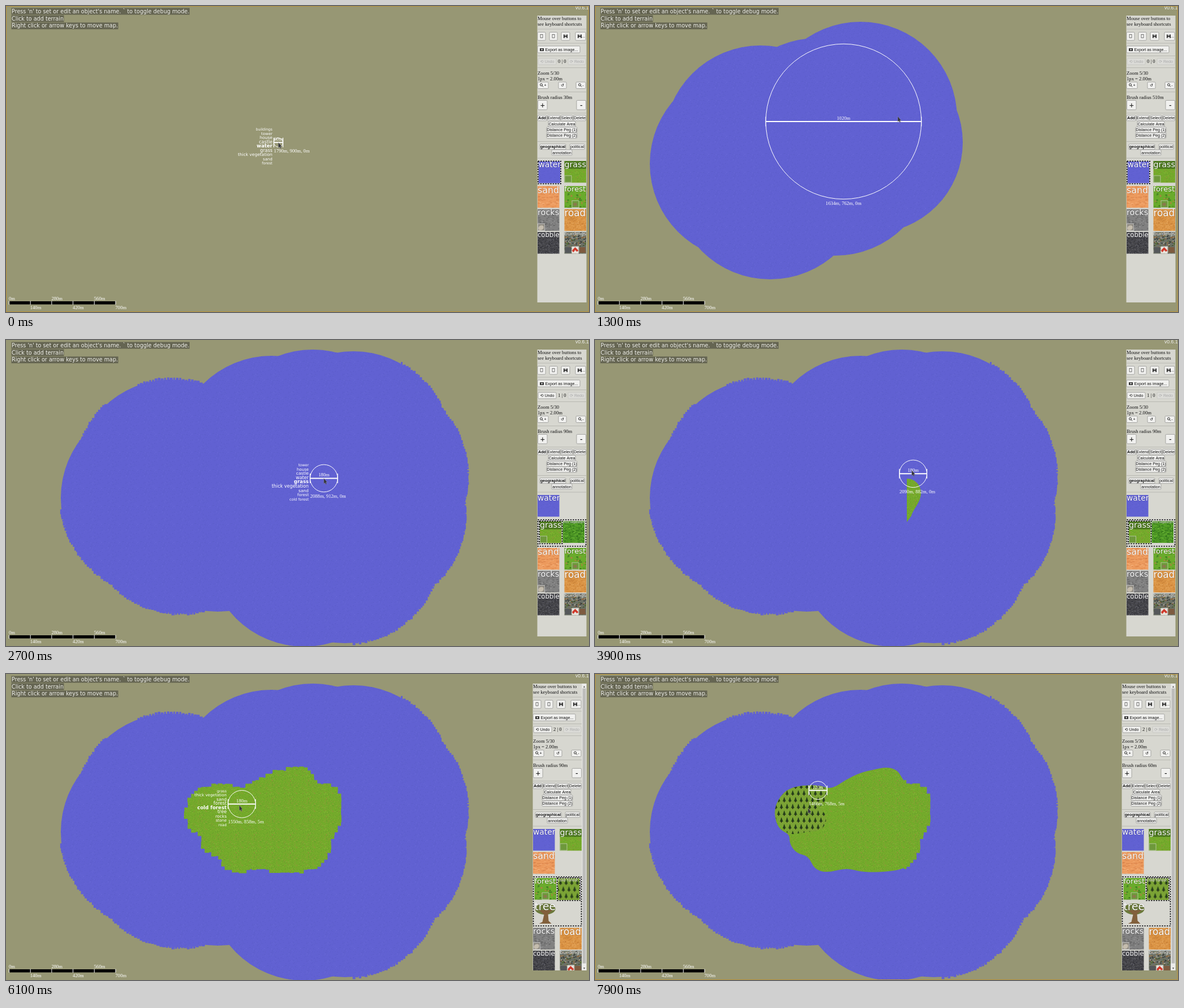
Write an HTML page with a canvas that moves like this. It is 1032x543 px and loops after 8000 ms.

```html
<!DOCTYPE html>
<html>
<head>
<meta charset="utf-8">
<style>
  html, body { margin: 0; width: 100%; height: 100%; overflow: hidden; background: #979774; }
  canvas { display: block; }
</style>
</head>
<body>
<canvas id="stage" width="1032" height="543"></canvas>
<script>
const c = document.getElementById('stage').getContext('2d');
const SERIF = '"Liberation Serif", serif';
const SANS = '"Liberation Sans", "DejaVu Sans", sans-serif';
const DEJAVU = '"DejaVu Sans", sans-serif';
const LOOP = 8000, STEP = 100, SCALE = 0.27;

let seed = 7;
const rand = () => (seed = (seed * 16807) % 2147483647) / 2147483647;

function pattern(w, h, paint) {
  const tile = document.createElement('canvas');
  tile.width = w;
  tile.height = h;
  paint(tile.getContext('2d'));
  return c.createPattern(tile, 'repeat');
}
const speckle = (base, dots, n, dw = 1, dh = 1) => pattern(32, 32, g => {
  g.fillStyle = base;
  g.fillRect(0, 0, 32, 32);
  for (let i = 0; i < n; i++) {
    g.fillStyle = dots[i % dots.length];
    g.fillRect(rand() * 32 | 0, rand() * 32 | 0, dw, dh);
  }
});
function fir(g, x, y) {
  g.fillStyle = '#26401a';
  g.beginPath();
  g.moveTo(x, y - 9);
  g.lineTo(x + 2.8, y - 1);
  g.lineTo(x - 2.8, y - 1);
  g.fill();
  g.fillStyle = '#33301c';
  g.fillRect(x - 1, y - 1, 2, 1.5);
}
const skin = {
  water: speckle('#6161d2', ['#5c5ccb', '#6767d6', '#5b5fc8'], 110),
  grass: speckle('#74aa2b', ['#659d29', '#84b436', '#94933a', '#6ba329'], 230),
  'thick vegetation': speckle('#4f9a24', ['#2f6f18', '#6cb836', '#3a8020'], 300, 2, 1),
  sand: speckle('#ec9a5d', ['#d9824a', '#f3ab72'], 80, 4, 1),
  forest: speckle('#6aab2c', ['#3d7a22', '#559226', '#a8863f'], 36, 3, 2),
  rocks: speckle('#818181', ['#6d6d6d', '#959595', '#5d5d5d'], 90, 3, 1),
  road: speckle('#da9344', ['#c47c34', '#e6a75c'], 130, 2, 1),
  cobble: speckle('#454549', ['#33333a', '#595960'], 210, 2, 1),
  buildings: speckle('#6c7166', ['#36393a', '#9a9a8c', '#596b3c', '#8d6a44'], 130, 2, 2),
  'cold forest': pattern(20, 24, g => {
    g.fillStyle = '#7ba335';
    g.fillRect(0, 0, 20, 24);
    fir(g, 5, 11); fir(g, 15, 11);
    fir(g, 10, 23); fir(g, 0, 23); fir(g, 20, 23);
  })
};
const labelSize = {
  water: 13.8, grass: 14.2, sand: 15.8, forest: 13.1, rocks: 14.4, road: 16.8,
  cobble: 11.6, buildings: 8.5, tree: 18.7, 'cold forest': 6.8, 'thick vegetation': 4.7
};

// Brush centre over time: [ms, x, y]
const track = [
  [0, 482.2, 242.2], [500, 482.2, 242.2], [600, 460, 255], [700, 425, 290],
  [800, 389.3, 325.4], [860, 377, 332], [1000, 300, 320], [1100, 265, 280],
  [1200, 300, 240], [1300, 440, 205], [1400, 600, 190], [1500, 646, 245],
  [1600, 620, 350], [1700, 500, 350], [1800, 520, 285.4], [1860, 529, 270],
  [2300, 562.7, 245.4], [3500, 562.7, 245.4], [3700, 552, 297], [3900, 563.2, 237.3],
  [4050, 557, 222], [4200, 517, 192], [4400, 440, 222], [4600, 360, 228],
  [4700, 350, 255], [4800, 370, 298], [4950, 410, 326], [5200, 520, 325],
  [5350, 552, 300], [5450, 566, 245], [5700, 430, 235], [6100, 417.4, 230.8],
  [6160, 413, 233], [6700, 395, 250], [6900, 388, 258], [7150, 350, 263],
  [7300, 338, 245], [7500, 350, 221], [7750, 386, 218], [7900, 394.7, 206.5], [7960, 377, 238]
];
const radii = [[0, 30], [100, 30], [500, 510], [1900, 510], [2400, 90], [6300, 90], [6700, 60], [8000, 60]];

function at(keys, t, col) {
  const i = keys.findIndex(k => k[0] > t);
  if (i < 0) return keys[keys.length - 1][col];
  const a = keys[i - 1], b = keys[i];
  return a[col] + (b[col] - a[col]) * (t - a[0]) / (b[0] - a[0]);
}
const pos = t => [at(track, t, 1), at(track, t, 2)];

// Water lobes: [ms, x, y, radius]
const lobes = [
  [500, 490, 242, 161], [700, 425, 272], [950, 310, 314], [1050, 268, 280], [1150, 293, 241],
  [1230, 393, 228], [1300, 470, 199], [1350, 543, 188], [1400, 615, 191], [1500, 646, 240],
  [1570, 642, 308], [1630, 600, 367], [1680, 528, 373], [1720, 453, 346]
];
function waterPath(list) {
  const p = new Path2D();
  for (const [, x, y, r = 171] of list) {
    p.moveTo(x + r, y);
    p.arc(x, y, r, 0, 7);
  }
  return p;
}
const settled = waterPath([...lobes.filter(l => l[1] !== 393 && l[1] !== 453), [0, 375, 311]]);
// Ragged shore: [x, y, from, to] in degrees
[[268, 280, 105, 172], [310, 314, 75, 150], [293, 241, 200, 228], [293, 241, 250, 292],
 [615, 191, -60, -18], [646, 240, -42, 22], [642, 308, -8, 46], [600, 367, 18, 85]
].forEach(([x, y, from, to]) => {
  for (let a = from; a < to; a += 1.8) {
    const q = a * Math.PI / 180, w = 3 + rand() * 3, h = 3 + rand() * 6;
    settled.rect(x + 171 * Math.cos(q) - w / 2, y + 171 * Math.sin(q) - h / 2, w, h);
  }
});

const shore = [
  [516, 165], [535, 170], [545, 187], [552, 196], [575, 196], [590, 210], [592, 240], [591, 268],
  [576, 288], [574, 312], [563, 336], [540, 348], [500, 352], [470, 351], [445, 344], [410, 353],
  [388, 346], [378, 323], [356, 318], [344, 300], [345, 285], [325, 275], [317, 250], [322, 224],
  [345, 200], [395, 196], [418, 205], [445, 187], [470, 175], [492, 170]
];
const island = new Path2D();
shore.forEach(([x, y], i) => {
  const [nx, ny] = shore[(i + 1) % shore.length];
  const mx = (x + nx) / 2, my = (y + ny) / 2;
  if (i) island.quadraticCurveTo(x, y, mx, my);
  else island.moveTo(mx, my);
});
island.quadraticCurveTo(...shore[0], 525.5, 167.5);
const raggedIsland = new Path2D();
for (let x = 316; x < 600; x += 6)
  for (let y = 160; y < 360; y += 6)
    if (c.isPointInPath(island, x + 3, y + 3)) raggedIsland.rect(x - rand(), y - rand() * 2, 8, 8);

function sweep(from, to, width, fill) {
  c.beginPath();
  for (let t = from; t <= to; t += 25) c.lineTo(...pos(t));
  c.fillStyle = c.strokeStyle = fill;
  c.lineWidth = width;
  c.lineJoin = c.lineCap = 'round';
  c.fill();
  c.stroke();
}

function drawMap(t) {
  c.fillStyle = '#979774';
  c.fillRect(0, 0, 1032, 543);
  c.fillStyle = skin.water;
  c.fill(t < 1900 ? waterPath(lobes.filter(l => l[0] <= t)) : settled);
  c.fillStyle = skin.grass;
  if (t >= 3800 && t < 4000) {
    c.beginPath();
    c.moveTo(552, 246);
    c.bezierCurveTo(566, 246, 577, 257, 577, 271);
    c.bezierCurveTo(577, 288, 563, 300, 560, 312);
    c.lineTo(552, 323);
    c.fill();
  } else if (t >= 4000 && t < 5500) {
    sweep(3700, t - 50, 50, skin.grass);
  } else if (t >= 5500 && t < 6900) {
    c.fill(raggedIsland);
  } else if (t >= 6900) {
    c.save();
    c.beginPath();
    c.rect(300, 150, 248, 220);
    c.clip();
    c.fill(island);
    c.restore();
    c.save();
    c.beginPath();
    c.rect(547, 150, 60, 220);
    c.clip();
    c.fill(raggedIsland);
    c.restore();
    c.save();
    c.clip(island);
    sweep(6900, t - 100, 42, skin['cold forest']);
    c.restore();
  }
}

function text(s, x, y, size = 8.64, font = SERIF, color = '#111', align = 'left', weight = '') {
  c.font = `${weight} ${size}px ${font}`;
  c.fillStyle = color;
  c.textAlign = align;
  c.fillText(s, x, y);
}
function line(x1, y1, x2, y2, width = 1, color = '#fff') {
  c.strokeStyle = color;
  c.lineWidth = width;
  c.beginPath();
  c.moveTo(x1, y1);
  c.lineTo(x2, y2);
  c.stroke();
}

const kinds = ['buildings', 'tower', 'house', 'castle', 'water', 'grass', 'thick vegetation',
  'sand', 'forest', 'cold forest', 'tree', 'rocks', 'stone', 'road'];
const kindAt = t => t < 2600 ? 4 : t < 5700 ? 5 : Math.min(9, 6 + Math.floor((t - 5700) / 100));

function drawBrush(t) {
  const [x, y] = pos(t), metres = Math.round(at(radii, t, 1) / 30) * 30, r = metres * SCALE;
  c.strokeStyle = '#fff';
  c.lineWidth = 1;
  c.lineCap = 'butt';
  c.beginPath();
  c.arc(x, y, r, 0, 7);
  c.stroke();
  line(x - r, y, x + r, y, 2);
  for (const end of [x - r, x + r]) line(end, y - 8.5, end, y + 8.5, 1.3);
  text(metres * 2 + 'm', x, y - 3, 8.64, SERIF, '#fff', 'center');
  const place = `${2 * Math.round(x / .54 + 2)}m, ${2 * Math.round(y / .54 + 1.5)}m, ${t < 5500 ? 0 : 5}m`;
  text(place, x - Math.min(r, c.measureText(place).width / 2), y + r + 10, 8.64, SERIF, '#fff');

  const changed = t < 2600 ? 0 : t < 5700 ? 2600 : 6000;
  c.globalAlpha = Math.max(0, Math.min(1, (900 - (t - changed)) / 400));
  if (t >= 400 && t < 2600) c.globalAlpha = 0;
  const pick = kindAt(t);
  for (let d = -4; d <= 4; d++) {
    text(kinds[pick + d], x - r - 2.5, y + 9 + d * 7.55, 8.6 - .53 * Math.abs(d), DEJAVU, '#fff', 'right', d ? '' : 'bold');
  }
  c.globalAlpha = 1;

  const [mx, my] = pos(t + 60);
  c.beginPath();
  [[0, 0], [0, 9.5], [2, 7.8], [3.5, 10.8], [4.8, 10], [3.5, 7.2], [5.8, 7]].forEach(([a, b]) => c.lineTo(mx + a, my + b));
  c.closePath();
  c.fillStyle = '#333338';
  c.fill();
  c.strokeStyle = '#aaa8';
  c.lineWidth = .6;
  c.stroke();
}

function drawHud() {
  ["Press 'n' to set or edit an object's name. ` to toggle debug mode.", 'Click to add terrain',
   'Right click or arrow keys to move map.'].forEach((s, i) => {
    c.font = `9.65px ${DEJAVU}`;
    c.fillStyle = 'rgba(60,60,55,.55)';
    c.fillRect(9.5, 3.5 + i * 12.9, c.measureText(s).width + 1, 12);
    text(s, 10, 12.6 + i * 12.9, 9.65, DEJAVU, '#f0f0ea');
  });
  text('v0.6.1', 1008, 6, 8.64, SANS, '#eee');
  c.fillStyle = '#000';
  c.fillRect(5, 524, 189, 5.5);
  for (let i = 0; i < 6; i++) {
    const x = 5.5 + i * 37.7, low = i % 2;
    line(x, 523.5, x, 530, 1);
    text(i * 140 + 'm', x - .5, low ? 538 : 521.5, 8.64, SERIF, '#fff');
  }
}

function button(s, x, y, w, h, opt = {}) {
  c.fillStyle = opt.off ? '#dcdcd8' : '#f1f1ef';
  c.strokeStyle = opt.off ? '#c2c2be' : '#8a8a88';
  c.lineWidth = .7;
  c.beginPath();
  c.roundRect(x, y, w, h, 1.5);
  c.fill();
  c.stroke();
  const size = opt.size || 7.2;
  text(s, x + w / 2 + (opt.shift || 0), y + h / 2 + size * .36, size, SANS, opt.off ? '#aaa' : '#111', 'center', opt.bold ? 'bold' : '');
}
function dashed(x, y, w, h) {
  c.lineWidth = 1.6;
  c.strokeStyle = '#eee';
  c.strokeRect(x, y, w, h);
  c.strokeStyle = '#000';
  c.setLineDash([2.6, 1.8]);
  c.strokeRect(x, y, w, h);
  c.setLineDash([]);
}
function box(x, y, w, h, color) {
  c.fillStyle = color;
  c.fillRect(x, y, w, h);
}

function tile(name, x, y, chosen) {
  const size = 38.5;
  c.save();
  c.translate(x, y);
  if (name === 'tree') {
    c.fillStyle = '#6c7a3c';
    c.beginPath();
    c.ellipse(19, 12, 18, 10, 0, 0, 7);
    c.fill();
    c.fillStyle = '#82603c';
    c.beginPath();
    [[8, 14], [17, 22], [14, 35], [8, 38], [30, 38], [25, 33], [24, 21], [32, 14]].forEach(p => c.lineTo(...p));
    c.fill();
  } else {
    box(0, 0, size, size, skin[name]);
  }
  if (name === 'grass') box(0, 0, size, 14, 'rgba(45,85,20,.55)');
  const inset = { grass: 0, forest: 13, rocks: 0, buildings: 13 }[name];
  if (inset !== undefined) {
    box(inset, 26, 12, 12, name === 'rocks' ? '#918d84' : name === 'buildings' ? '#e8e4dc' : '#6e993b');
    if (name === 'rocks') {
      c.fillStyle = '#c5bdae';
      c.beginPath();
      c.ellipse(6, 33, 5, 4, -.5, 0, 7);
      c.fill();
    } else if (name === 'buildings') {
      c.fillStyle = '#d03a2c';
      c.beginPath();
      [[13, 33], [19, 27], [25, 33], [22, 35], [19, 32], [16, 36]].forEach(p => c.lineTo(...p));
      c.fill();
      box(1, 27, 11, 10, '#55585a');
      box(26, 27, 11, 10, '#7d5b40');
    } else if (name === 'forest') {
      box(16, 30, 6, 5, '#8a7a4c');
    }
    c.strokeStyle = '#ddd9';
    c.lineWidth = 1;
    c.strokeRect(inset + .5, 26, 12, 12);
  }
  c.shadowColor = '#0008';
  c.shadowBlur = 1;
  text(name, 0, labelSize[name] * .76, labelSize[name], DEJAVU, '#fff');
  c.shadowBlur = 0;
  if (chosen) dashed(-.8, -.8, size + 1.8, size + 1.8);
  c.restore();
}

const layouts = [
  { selected: 'water', rows: [['water', 'grass', 276], ['sand', 'forest', 319.5], ['rocks', 'road', 360.5], ['cobble', 'buildings', 401]] },
  { rows: [['water', '', 275], ['sand', 'forest', 369], ['rocks', 'road', 409.5], ['cobble', 'buildings', 450]],
    group: [319, 47], inner: [['grass', 945, 322], ['thick vegetation', 985.5, 321.5]] },
  { rows: [['water', 'grass', 275], ['sand', '', 316], ['rocks', 'road', 450.5], ['cobble', 'buildings', 491]],
    group: [360, 87], inner: [['forest', 943.5, 362], ['cold forest', 984.5, 362.5], ['tree', 943.5, 405]] }
];

function drawPanel(t) {
  const kind = kindAt(t), mode = kind === 4 ? 0 : kind < 8 ? 1 : 2;
  const shift = mode === 2 ? -8 : 0;
  box(940.5 + shift, 17, 87 - shift, 509, '#d7d7d0');
  c.save();
  c.beginPath();
  c.rect(932, 17, 96, 509);
  c.clip();
  if (shift) {
    box(1019.5, 17, 8, 509, '#ececea');
    box(1020.5, 25.5, 6, 488, '#bdbdbb');
    text('▴', 1023.5, 24, 6, DEJAVU, '#555', 'center');
    text('▾', 1023.5, 524, 6, DEJAVU, '#555', 'center');
  }
  c.translate(shift, 0);
  for (const y of [41, 66, 88.5, 109.5, 152.5, 190, 240.5, 270]) line(941, y, 1027, y, .8, '#b0b0aa');
  text('Mouse over buttons to', 941, 25);
  text('see keyboard shortcuts', 941, 34.5);
  [[941, 14], [962, 14], [983, 15], [1008, 18]].forEach(([x, w], i) => {
    button(i === 3 ? '...' : '', x, 46.5, w, 14.5, { shift: 5 });
    if (i < 2) {
      c.strokeStyle = '#555';
      c.lineWidth = .8;
      c.strokeRect(x + 5, 50.5, 4, 6);
    } else {
      box(x + 4, 50.5, 7, 6.5, '#222');
      box(x + 5.5, 50.5, 4, 2, '#eee');
      box(x + 5.5, 54.5, 4, 2.5, '#ccc');
    }
  });
  button('Export as image...', 941, 71, 75, 12, { shift: 5 });
  box(945, 75, 7, 5, '#333');
  box(947.5, 76.3, 2.2, 2.2, '#eee');
  const undo = t < 1700 ? 0 : t < 5500 ? 1 : 2;
  button('⟲ Undo', 942, 93, 32, 11, { off: !undo });
  text(undo + ' | 0', 977, 101);
  button('⟳ Redo', 995, 93, 31, 11, { off: true });
  text('Zoom 5/30', 941, 122);
  text('1px = 2.00m', 941, 131.5);
  [['+', 941, 19], ['-', 1009, 17]].forEach(([s, x, w]) => {
    button(s, x, 135, w, 11.5, { shift: 4 });
    c.strokeStyle = '#222';
    c.lineWidth = 1;
    c.beginPath();
    c.arc(x + 6.5, 139.8, 2, 0, 7);
    c.stroke();
    line(x + 8, 141.3, x + 10, 143.5, 1, '#222');
  });
  button('↺', 978, 135, 14, 11.5);
  text(`Brush radius ${Math.round(at(radii, t, 1) / 30) * 30}m`, 941, 164.5);
  button('+', 941.5, 167.5, 16.5, 16.5, { size: 14 });
  button('-', 1010, 167.5, 16.5, 16.5, { size: 14 });
  [['Add', 941, 194, 16], ['Extend', 958, 194, 23], ['Select', 982.2, 194, 21], ['Delete', 1004.5, 194, 22],
   ['Calculate Area', 960, 204.7, 48], ['Distance Peg (1)', 957, 214.9, 54], ['Distance Peg (2)', 957, 225.1, 54],
   ['geographical', 945, 245, 46], ['political', 998, 245, 26], ['annotation', 966, 255.3, 36]
  ].forEach(([s, x, y, w]) => button(s, x, y, w, 9.6, { bold: s === 'Add' || s === 'geographical' }));

  const { rows, selected, group, inner = [] } = layouts[mode];
  for (const [left, right, y] of rows) {
    const chosen = left === selected;
    tile(left, chosen ? 942.5 : 941, y, chosen);
    if (right) tile(right, 988.5, chosen ? 275 : y);
  }
  if (group) dashed(941.5, group[0], 85, group[1]);
  for (const [name, x, y] of inner) tile(name, x, y, name === kinds[mode === 2 ? 9 : Math.min(kind, 6)]);
  c.restore();
}

let shown = -1;
function frame() {
  const t = Math.floor(performance.now() % LOOP / STEP) * STEP;
  if (t !== shown) {
    shown = t;
    drawMap(t);
    drawBrush(t);
    drawHud();
    drawPanel(t);
    if (t < 2000 || t >= 6200) {
      c.strokeStyle = '#b8923a';
      c.lineWidth = 1;
      c.strokeRect(.5, .5, 1030.5, 542);
    }
  }
  requestAnimationFrame(frame);
}
frame();
</script>
</body>
</html>
```
